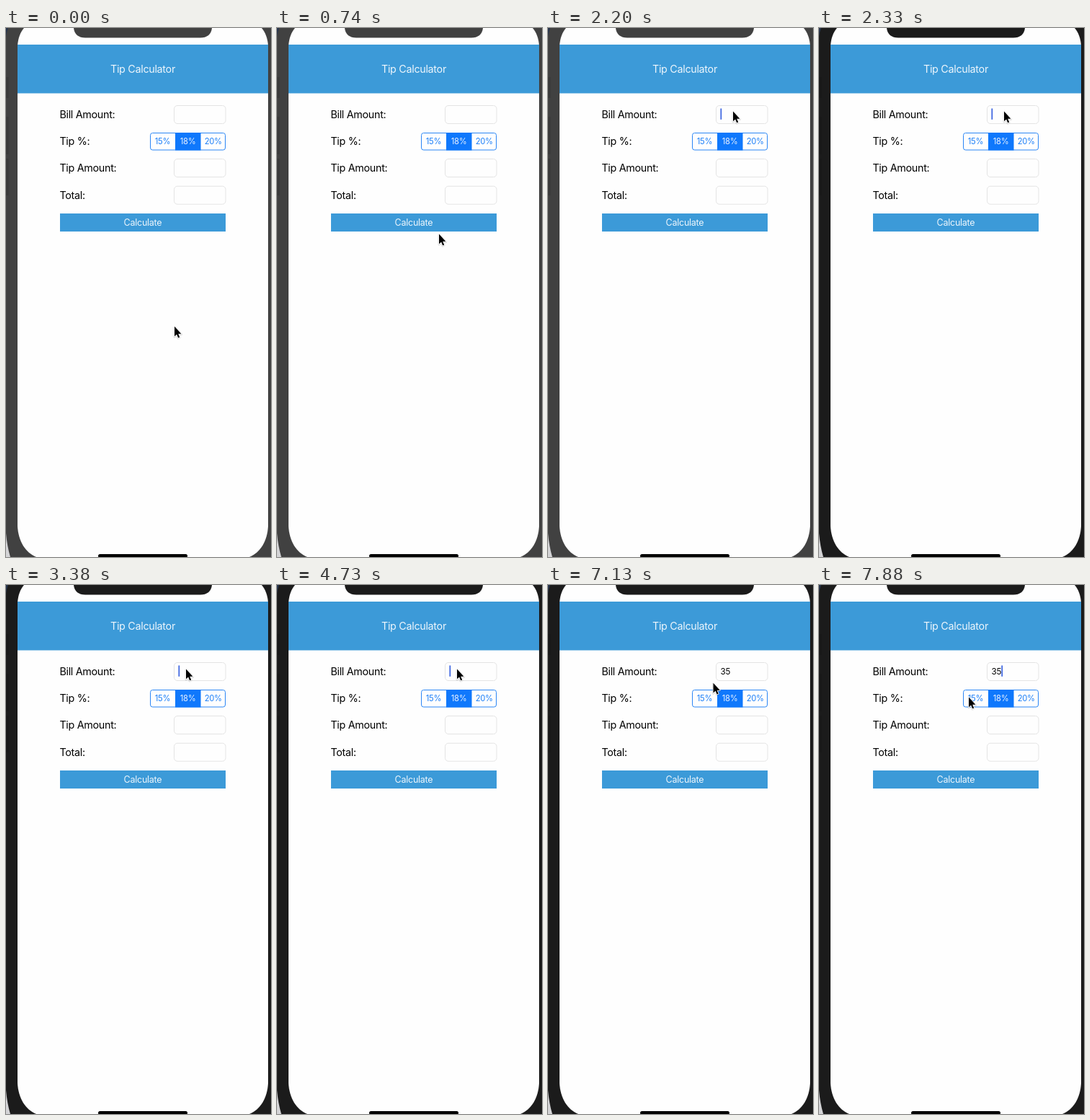
Recreate the animation shown at these times as an HTML page. Size 368 px wide and 733 px high, loop 8 s.

```html
<!DOCTYPE html>
<html lang="en">
<head>
<meta charset="utf-8">
<title>Tip Calculator</title>
<style>
  html, body { margin: 0; width: 100%; height: 100%; overflow: hidden; background: #fefefe; }
  svg { display: block; width: 368px; height: 733px; }
  text { font-family: Inter, "Liberation Sans", sans-serif; letter-spacing: -.02em; }
  .label { font-size: 14.3px; fill: #000; }
  .mid { text-anchor: middle; }
  .title { font-size: 14.3px; fill: #eef6fc; }
  .button { font-size: 12.5px; fill: #eef6fc; }
  .seg { font-size: 11.2px; fill: #1a7ef8; }
  .value { font-size: 11.6px; fill: #000; }
  .field { fill: #fefefe; stroke: #e4e4e4; }
</style>
</head>
<body>
<svg viewBox="0 0 368 733" xmlns="http://www.w3.org/2000/svg">
  <rect id="bezel" width="368" height="733"/>
  <path d="M0 700Q1.5 718 6 733H0Z" fill="#d4d4d6"/>
  <path d="M0 0H3Q1 5 0 12Z" fill="#26344c"/>
  <g fill="#000" opacity=".1">
    <rect y="68" width="3.5" height="29"/>
    <rect y="123" width="3.5" height="52"/>
    <rect y="181" width="3.5" height="51"/>
  </g>
  <path fill="#fefefe" d="M25 0C20 6 17 13 16 24V690C17 711 27 727 42 733H338C353 727 363 711 364 690V24C363 13 360 6 355 0Z"/>
  <path id="notch" d="M94 0C95 9 101 13.5 110 13.5H270C279 13.5 285 9 286 0Z"/>
  <rect x="128" y="729" width="124" height="5" rx="2.5"/>

  <rect x="16" y="23" width="348" height="67.5" fill="#3c9ad8"/>
  <text class="title mid" x="190" y="62">Tip Calculator</text>

  <text class="label" x="74.4" y="125">Bill Amount:</text>
  <text class="label" x="74.4" y="162">Tip %:</text>
  <text class="label" x="74.4" y="199">Tip Amount:</text>
  <text class="label" x="74.4" y="237">Total:</text>

  <rect class="field" x="233.5" y="107.5" width="71.5" height="25" rx="4.5"/>
  <rect class="field" x="233.5" y="181.5" width="71.5" height="25" rx="4.5"/>
  <rect class="field" x="233.5" y="219.2" width="71.5" height="25" rx="4.5"/>

  <rect x="200.5" y="145.5" width="104" height="23.5" rx="3" fill="#fefefe" stroke="#2a86f5"/>
  <rect x="235" y="145" width="35.5" height="24.5" fill="#0f78fc"/>
  <text class="seg mid" x="217.5" y="161.2">15%</text>
  <text class="seg mid" x="252.7" y="161.2" style="fill:#e8f2ff">18%</text>
  <text class="seg mid" x="287.8" y="161.2">20%</text>

  <rect x="75" y="257" width="230" height="25" fill="#3c9ad8"/>
  <text class="button mid" x="190" y="274.4">Calculate</text>

  <text id="bill" class="value" x="239.6" y="124"></text>
  <rect id="caret" y="111.5" width="1.8" height="15.3" fill="#4269e2"/>
  <g id="pointer">
    <path d="M1 2V15.5L4 12.8 6 17.4 8 16.5 6 12H10.5Z" fill="none" stroke="#000" stroke-width="3" stroke-linejoin="round" opacity=".12"/>
    <path d="M1 1V14.8L4.1 12 6.1 16.8 8.2 15.9 6.2 11.2H10.4Z" stroke="#fff" stroke-width="1.6" stroke-linejoin="round" paint-order="stroke"/>
  </g>
</svg>
<script>
const LOOP = 8000;
const el = id => document.getElementById(id);
const smooth = p => p * p * (3 - 2 * p);
const speedUp = p => p ** 1.7;

// Pointer moves: first step, last step, step count, goal, easing.
const start = [233, 412.5];
const moves = [
  [140, 740, 5, [224, 284.5], smooth],
  [1040, 1780, 6, [256, 114.5], speedUp],
  [2930, 3080, 2, [248, 115.5], smooth],
  [3380, 3380, 1, [249, 115.5], smooth],
  [6980, 7430, 4, [208, 154], smooth],
  [7880, 7880, 1, [207, 154.5], smooth]
];

// Times at which the caret fades out and comes back.
const blinks = [[590, 1190], [1630, 2200], [4130, 4730], [5180, 5330], [5930, 6530], [6980, 7580]];

function pointerAt(t) {
  let pos = start;
  for (const [first, last, count, goal, ease] of moves) {
    if (t < first) break;
    const gap = (last - first) / (count - 1) || 1;
    const step = Math.min(count, Math.floor((t - first + 8) / gap) + 1);
    const p = ease(step / count);
    pos = pos.map((v, i) => v + (goal[i] - v) * p);
  }
  return pos;
}

function caretAt(t) {
  if (t < 140) return 0;
  const blink = blinks.find(([off, on]) => t >= off && t < on);
  if (!blink) return 1;
  return t - blink[0] < 150 ? .5 : 0;
}

function draw(t) {
  const tone = t < 2330 ? "#414141" : "#1b1b1b";
  el("bezel").setAttribute("fill", tone);
  el("notch").setAttribute("fill", tone);

  const typed = t < 5330 ? 0 : t < 5480 ? 1 : 2;
  el("bill").textContent = "35".slice(0, typed);
  el("caret").setAttribute("x", 239.4 + typed * 6.95);
  el("caret").setAttribute("opacity", caretAt(t));

  el("pointer").setAttribute("transform", `translate(${pointerAt(t)})`);
}

function tick() {
  draw(performance.now() % LOOP);
  requestAnimationFrame(tick);
}
tick();
</script>
</body>
</html>
```
